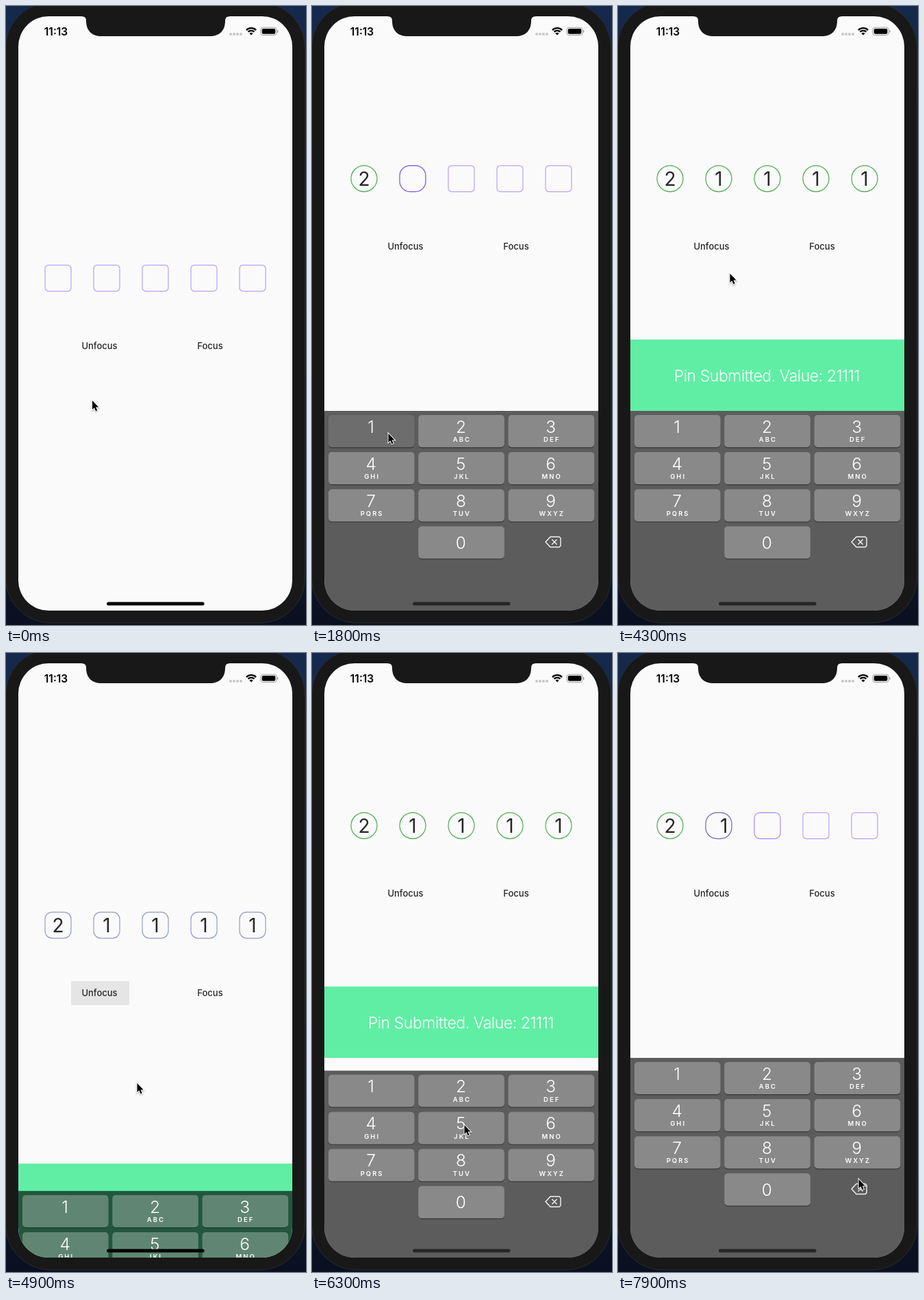
Animation of 438 by 902 pixels, one loop 8 s. Source, as an HTML page with a canvas:

```html
<!DOCTYPE html>
<html lang="en">
<head>
<meta charset="utf-8">
<title>Pin input</title>
<style>
  html, body { margin: 0; width: 100%; height: 100%; overflow: hidden; background: #181818; }
  canvas { display: block; width: 438px; height: 902px; }
</style>
</head>
<body>
<canvas id="stage"></canvas>
<script>
const W = 438, H = 902, LOOP = 8000, STEP = 100;
const canvas = document.getElementById('stage');
const ctx = canvas.getContext('2d');
const ratio = window.devicePixelRatio || 1;
canvas.width = W * ratio;
canvas.height = H * ratio;

const SCREEN = { x: 18, y: 15, w: 400, h: 866, r: 44 };
const BOTTOM = 881, KEYS_TOP = 590;
const INK = '#262626';

// [time, digits entered, focused]
const EVENTS = [
  [0, 0, false], [480, 0, true], [1420, 1, true], [1850, 2, true], [2150, 3, true],
  [2440, 4, true], [2760, 5, true], [4775, 5, false], [6057, 5, true],
  [7060, 4, true], [7300, 3, true], [7530, 2, true], [7760, 1, true]
];
const PIN = '21111';
const FOLLOW = { c: [124, 77, 255, 0.5], r: 5 };
const SELECT = { c: [124, 77, 255, 1], r: 15 };
const DONE = { c: [76, 175, 80, 1], r: 19 };

// [time, x, y]
const PATH = [
  [0, 125.5, 574], [100, 125.5, 574], [420, 298, 495], [540, 298, 495],
  [900, 149, 620], [1320, 215, 618], [1480, 215, 618], [1780, 111, 622],
  [3400, 111, 622], [4300, 163, 389], [4600, 138, 348], [4740, 138, 348],
  [4900, 191, 626], [5150, 200, 638], [5900, 298, 496], [6060, 298, 496],
  [6300, 222, 687], [6800, 351, 766], [LOOP, 351, 766]
];

const clamp = v => Math.max(0, Math.min(1, v));
const mix = (a, b, p) => a + (b - a) * p;
const smooth = p => p * p * (3 - 2 * p);

function spring(ms) {
  if (ms <= 0) return 0;
  if (ms > 520) return 1;
  const x = ms * 0.0183;
  return 1 - (1 + x) * Math.exp(-x);
}

function text(str, x, y, size, weight, color, spacing = 0) {
  ctx.font = `${weight} ${size}px Inter, "Liberation Sans", sans-serif`;
  ctx.letterSpacing = spacing + 'px';
  ctx.textAlign = 'center';
  ctx.fillStyle = color;
  ctx.fillText(str, x + spacing / 2, y + size * 0.364);
}

function box(x, y, w, h, r) {
  ctx.beginPath();
  ctx.roundRect(x, y, w, h, r);
}

function fillBox(x, y, w, h, r, color) {
  box(x, y, w, h, r);
  ctx.fillStyle = color;
  ctx.fill();
}

function poly(points, close = true) {
  ctx.beginPath();
  points.forEach(([x, y]) => ctx.lineTo(x, y));
  if (close) ctx.closePath();
}

function stateAt(t) {
  let i = EVENTS.length - 1;
  while (EVENTS[i][0] > t) i--;
  const [time, n, focus] = EVENTS[i];
  const [, oldN, oldFocus] = EVENTS[Math.max(0, i - 1)];
  return { n, focus, oldN, oldFocus, p: clamp((t - time) / 200) };
}

function fieldStyle(i, n, focus) {
  if (!focus) return FOLLOW;
  return i < n ? DONE : i === n ? SELECT : FOLLOW;
}

function drawFields(s) {
  const cy = s.focus ? 251.5 : 396.5;
  for (let i = 0; i < 5; i++) {
    const cx = 76 + 71 * i;
    const a = fieldStyle(i, s.oldN, s.oldFocus), b = fieldStyle(i, s.n, s.focus);
    const c = a.c.map((v, k) => mix(v, b.c[k], s.p));
    box(cx - 19, cy - 19, 38, 38, mix(a.r, b.r, s.p));
    ctx.lineWidth = 1.25;
    ctx.strokeStyle = `rgba(${c.join(',')})`;
    ctx.stroke();
    const shown = mix(i < s.oldN ? 1 : 0, i < s.n ? 1 : 0, s.p);
    if (shown > 0) text(PIN[i], cx + 11 * (1 - shown), cy + 0.5, 28, 400, INK);
  }
}

function drawButtons(t, s) {
  const cy = s.focus ? 350 : 495;
  const glow = (from, to) => clamp((t - from) / 80) * clamp((to - t) / 120);
  const press = (cx, w, level) => {
    if (level > 0) fillBox(cx - w / 2, cy - 17, w, 35, 2, `rgba(0,0,0,${0.085 * level})`);
  };
  press(137.5, 85, glow(4580, 5060));
  press(298, 85, Math.max(glow(400, 640), glow(5960, 6230)));
  text('Unfocus', 136.5, cy, 13, 500, INK);
  text('Focus', 298, cy, 13, 500, INK);
}

function drawSnack(t, s, keysTop) {
  const p = smooth(clamp((t - 2960) / 250)) * smooth(clamp((7100 - t) / 250));
  if (p <= 0) return;
  const bottom = s.focus ? KEYS_TOP : BOTTOM;
  const h = (s.focus ? 104 : 137) * p;
  const top = bottom - h;
  ctx.fillStyle = '#60eea5';
  ctx.fillRect(SCREEN.x, top, SCREEN.w, h);
  ctx.save();
  ctx.beginPath();
  ctx.rect(SCREEN.x, top, SCREEN.w, Math.max(0, Math.min(bottom, keysTop) - top));
  ctx.clip();
  ctx.globalAlpha = p;
  text('Pin Submitted. Value: ' + PIN, 217.5, top + 52.5, 23, 300, '#fff', -0.45);
  ctx.restore();
}

function pressedKey(t) {
  for (let i = 2; i < EVENTS.length; i++) {
    const [time, n] = EVENTS[i], before = EVENTS[i - 1][1];
    if (t > time - 70 && t < time + 80 && n !== before) return n > before ? PIN[n - 1] : 'del';
  }
  return '';
}

function drawDelete(y, down) {
  const x = 352;
  ctx.lineWidth = 1.4;
  ctx.lineJoin = ctx.lineCap = 'round';
  ctx.strokeStyle = '#f4f4f4';
  poly([[x - 11, y], [x - 4, y - 7.5], [x + 9, y - 7.5], [x + 11, y - 5.5],
    [x + 11, y + 5.5], [x + 9, y + 7.5], [x - 4, y + 7.5]]);
  if (down) {
    ctx.fillStyle = '#f4f4f4';
    ctx.fill();
  }
  ctx.stroke();
  if (down) ctx.strokeStyle = '#5c5c5c';
  for (const d of [-3.2, 3.2]) {
    poly([[x + 2 - 3.2, y - d], [x + 2 + 3.2, y + d]], false);
    ctx.stroke();
  }
}

function drawKeys(t, top) {
  if (top >= BOTTOM) return;
  const down = pressedKey(t);
  ctx.fillStyle = 'rgba(0,0,0,0.63)';
  ctx.fillRect(SCREEN.x, top, SCREEN.w, BOTTOM - top);
  const letters = ['', 'ABC', 'DEF', 'GHI', 'JKL', 'MNO', 'PQRS', 'TUV', 'WXYZ'];
  for (let i = 0; i < 10; i++) {
    const last = i === 9;
    const x = 24 + 131.3 * (last ? 1 : i % 3);
    const y = top + 6 + 54.1 * Math.floor(i / 3);
    const label = last ? '0' : String(i + 1);
    const mid = x + 62.6;
    ctx.save();
    ctx.beginPath();
    ctx.rect(x, y + 42, 126, 8);
    ctx.clip();
    box(x, y + 1.2, 125.5, 47, 5);
    ctx.roundRect(x, y, 125.5, 47, 5);
    ctx.fillStyle = 'rgba(0,0,0,0.4)';
    ctx.fill('evenodd');
    ctx.restore();
    fillBox(x, y, 125.5, 47, 5, `rgba(255,255,255,${down === label ? 0.1 : 0.28})`);
    text(label, mid - 0.5, y + (last ? 23.5 : 16.8), 24.5, 300, '#fff');
    if (!last && letters[i]) text(letters[i], mid, y + 35.7, 9.5, 600, '#fff', 2);
  }
  drawDelete(top + 191, down === 'del');
}

function drawStatus() {
  text('11:13', 73, 37, 15.5, 600, '#000');
  ctx.fillStyle = '#c6c6c8';
  for (let i = 0; i < 4; i++) fillBox(326 + i * 5, 39, 4, 4, 2, '#c6c6c8');

  ctx.strokeStyle = '#000';
  ctx.lineCap = 'butt';
  ctx.lineWidth = 2.3;
  for (const r of [10, 6.4]) {
    ctx.beginPath();
    ctx.arc(358, 42.2, r, -Math.PI * 0.75, -Math.PI * 0.25);
    ctx.stroke();
  }
  ctx.beginPath();
  ctx.moveTo(358, 42.6);
  ctx.arc(358, 42.6, 3.6, -Math.PI * 0.75, -Math.PI * 0.25);
  ctx.fillStyle = '#000';
  ctx.fill();

  box(372, 31.3, 23, 11.2, 3.3);
  ctx.lineWidth = 1;
  ctx.strokeStyle = '#9a9a9a';
  ctx.stroke();
  fillBox(373.7, 33, 19.6, 7.8, 2, '#000');
  fillBox(396, 35, 1.4, 4, [0, 1.4, 1.4, 0], '#9a9a9a');
}

function drawNotch() {
  ctx.beginPath();
  ctx.moveTo(110, 14);
  ctx.lineTo(110, 15);
  ctx.quadraticCurveTo(117, 15, 117, 21);
  ctx.bezierCurveTo(117, 36, 125, 44, 140, 44);
  ctx.lineTo(297, 44);
  ctx.bezierCurveTo(312, 44, 320, 36, 320, 21);
  ctx.quadraticCurveTo(320, 15, 327, 15);
  ctx.lineTo(327, 14);
  ctx.fillStyle = '#181818';
  ctx.fill();
}

function drawPhone() {
  const g = ctx.createLinearGradient(0, 0, 0, H);
  g.addColorStop(0, '#15294d');
  g.addColorStop(0.5, '#12203c');
  g.addColorStop(1, '#0a1020');
  ctx.fillStyle = g;
  ctx.fillRect(0, 0, W, H);
  fillBox(-0.5, -5, 437, 904, 66, '#181818');
  ctx.lineWidth = 1;
  ctx.strokeStyle = '#2a2b2e';
  ctx.stroke();
}

function drawCursor(t) {
  let i = 1;
  while (i < PATH.length - 1 && PATH[i][0] < t) i++;
  const a = PATH[i - 1], b = PATH[i];
  const p = smooth(clamp((t - a[0]) / (b[0] - a[0])));
  ctx.save();
  ctx.translate(mix(a[1], b[1], p), mix(a[2], b[2], p));
  poly([[0.5, 1], [0.5, 14], [3.4, 11.3], [5.5, 16.2], [7.7, 15.2], [5.6, 10.5], [9.6, 10.5]]);
  ctx.shadowColor = 'rgba(0,0,0,0.35)';
  ctx.shadowBlur = 2 * ratio;
  ctx.shadowOffsetY = ratio;
  ctx.lineJoin = 'miter';
  ctx.lineWidth = 2;
  ctx.strokeStyle = '#fff';
  ctx.stroke();
  ctx.shadowColor = 'transparent';
  ctx.fillStyle = '#000';
  ctx.fill();
  ctx.restore();
}

function draw(t) {
  const s = stateAt(t);
  const up = spring(t - 480) - spring(t - 4775) + spring(t - 6057);
  const keysTop = mix(BOTTOM, KEYS_TOP, up);

  ctx.setTransform(ratio, 0, 0, ratio, 0, 0);
  drawPhone();
  ctx.save();
  box(SCREEN.x, SCREEN.y, SCREEN.w, SCREEN.h, SCREEN.r);
  ctx.clip();
  ctx.fillStyle = '#fafafa';
  ctx.fillRect(SCREEN.x, SCREEN.y, SCREEN.w, SCREEN.h);
  drawFields(s);
  drawButtons(t, s);
  drawSnack(t, s, keysTop);
  drawKeys(t, keysTop);
  drawStatus();
  fillBox(147, 868.5, 142.5, 5, 2.5, up > 0.5 ? '#262626' : '#050505');
  ctx.restore();
  drawNotch();
  drawCursor(t);
}

function frame() {
  const t = performance.now() % LOOP;
  draw(Math.floor(t / STEP) * STEP);
  requestAnimationFrame(frame);
}
frame();
</script>
</body>
</html>
```
